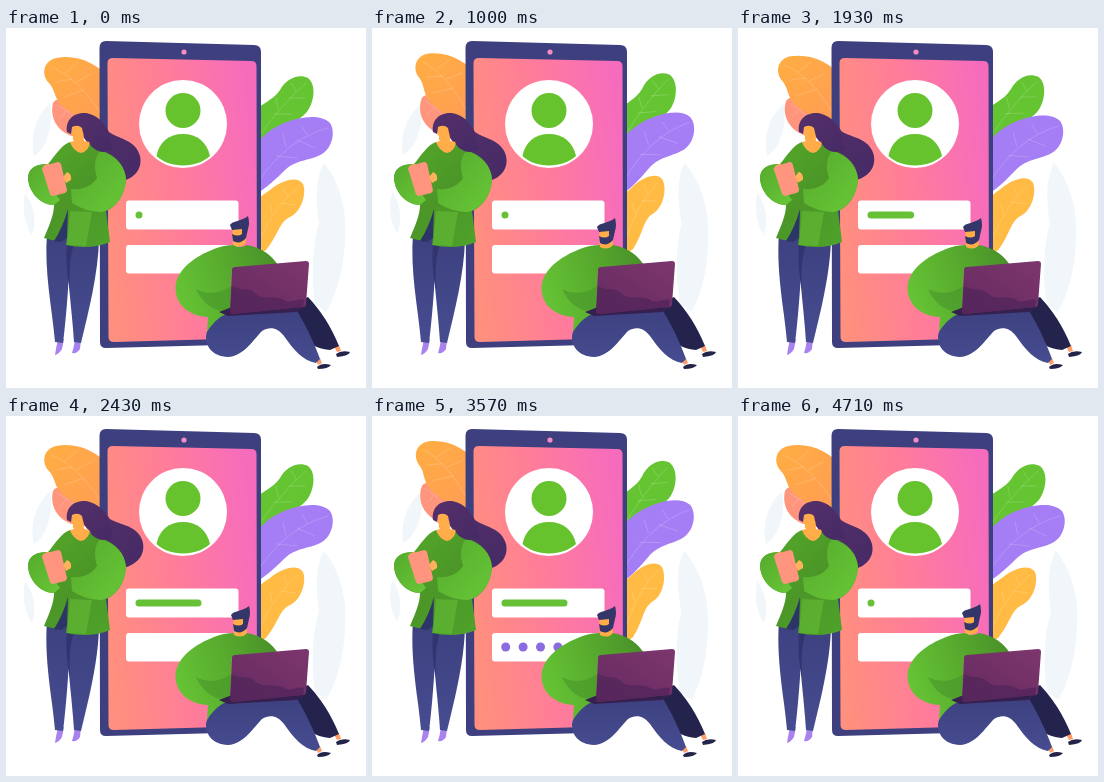
Write an HTML page that moves like this. It is 360 px wide and 360 px high and loops after 4780 ms.

```html
<!DOCTYPE html>
<html lang="en">
<head>
<meta charset="utf-8">
<title>Sign in</title>
<style>
html, body { margin: 0; width: 100%; height: 100%; overflow: hidden; background: #fff; }
svg { display: block; width: 100vw; height: 100vh; }
.vein { fill: none; stroke: #fff; stroke-opacity: .25; stroke-width: .7; stroke-linecap: round; }
</style>
</head>
<body>
<svg viewBox="0 0 360 360">
  <defs>
    <linearGradient id="screen" x1="0" y1=".6" x2="1" y2=".4">
      <stop offset="0" stop-color="#ff8f7e"/><stop offset=".5" stop-color="#ff7c9b"/><stop offset="1" stop-color="#f66cbd"/>
    </linearGradient>
    <linearGradient id="coat" x1="0" y1="0" x2="1" y2="1">
      <stop offset="0" stop-color="#57ab2c"/><stop offset=".5" stop-color="#4b9627"/><stop offset="1" stop-color="#4fa52c"/>
    </linearGradient>
    <linearGradient id="sleeve" x1="0" y1="0" x2="1" y2="1">
      <stop offset="0" stop-color="#55aa2c"/><stop offset="1" stop-color="#68c737"/>
    </linearGradient>
    <linearGradient id="sweater" x1="0" y1=".6" x2="1" y2=".3">
      <stop offset="0" stop-color="#66c435"/><stop offset=".5" stop-color="#59ad2e"/><stop offset="1" stop-color="#4a9229"/>
    </linearGradient>
    <linearGradient id="hair" x1="0" y1="0" x2="1" y2="1">
      <stop offset="0" stop-color="#563069"/><stop offset="1" stop-color="#452a66"/>
    </linearGradient>
    <linearGradient id="lid" x1="0" y1="1" x2="1" y2="0">
      <stop offset="0" stop-color="#642b60"/><stop offset="1" stop-color="#7d366e"/>
    </linearGradient>
    <linearGradient id="jeans" x1="0" y1="0" x2="0" y2="1">
      <stop offset="0" stop-color="#3d4180"/><stop offset="1" stop-color="#464c90"/>
    </linearGradient>
    <linearGradient id="gold" x1="0" y1="0" x2="1" y2="1">
      <stop offset="0" stop-color="#ffae42"/><stop offset="1" stop-color="#ff9a58"/>
    </linearGradient>
  </defs>

  <g fill="#f1f6fa">
    <path data-sway="3 50 190" d="M44 76C31 86 23 108 28 128C39 122 48 100 44 76Z"/>
    <path data-sway="3 50 190" d="M19 165C16 180 18 196 26 207C31 193 28 178 19 165Z"/>
    <path data-sway="-2 315 300" d="M318 135C309 150 310 175 313 195C306 220 305 250 309 276L320 284C334 262 341 225 339 190C337 168 329 148 318 135Z"/>
  </g>

  <g data-sway="6 96 100">
    <path fill="#ff957c" d="M47 75C51 68 63 69 72 78C84 88 92 96 100 112L70 109C54 106 43 92 47 75Z"/>
    <path class="vein" d="M51 77Q66 84 82 104M62 84l2-8M60 83l-6 8"/>
  </g>
  <g data-sway="6 100 95">
    <path fill="url(#gold)" d="M110 104L106 52C90 34 70 26 50 30C38 33 35 45 42 54C48 60 48 66 52 73C60 85 80 92 110 104Z"/>
    <path class="vein" d="M45 39Q72 49 98 90M59 45l12-10M70 54l15-8M66 51l-16 3M78 62l-20 7"/>
  </g>
  <g data-sway="-4.5 252 112">
    <path fill="#65c431" d="M246 122L246 86C253 76 267 73 274 62C280 51 292 45 302 50C311 57 308 76 300 85C289 97 272 97 262 113Z"/>
    <path class="vein" d="M300 55Q278 74 253 108M290 63l-5-8M283 70h16M272 81l-2-11M268 86h18"/>
  </g>
  <g data-sway="-5 250 160">
    <path fill="#a57ef5" d="M244 170L246 124C253 110 264 101 278 95C296 88 315 86 324 95C330 104 326 120 316 126C304 133 290 131 278 143C268 153 258 162 244 170Z"/>
    <path class="vein" d="M322 100Q281 111 252 154M301 107l-5-9M291 112l18 8M280 119l-3-13M271 128l20 2"/>
  </g>
  <g data-sway="-7 252 212">
    <path fill="#ffbb43" d="M246 230L245 186C249 172 256 167 264 162C275 153 291 147 297 156C301 166 295 184 284 189C273 194 273 206 260 222Z"/>
    <path class="vein" d="M292 159Q269 178 254 211M281 168l-3-8M275 175l14 2M266 186l-2-10"/>
  </g>

  <path fill="#3d3f7f" d="M93.500 20Q93.500 13 100 13L248 17Q255 17 255 24V286H215V317L100 320Q94 320 94 314Z"/>
  <path fill="url(#screen)" d="M101.500 35Q101.500 30 107 30L245 33Q250.500 33 250.500 38L251 286H215V311L108 314Q102.500 314 102.500 309Z"/>
  <circle cx="178" cy="24" r="2.600" fill="#f58bc5"/>

  <circle cx="177" cy="96" r="44" fill="#fff"/>
  <g fill="#66c32e">
    <circle cx="177" cy="82.500" r="17.500"/>
    <path d="M150.500 128C153 114 163 106 177 106S201 114 204 128C197 134 188 137.500 177 137.500S157 134 150.500 128Z"/>
  </g>
  <rect x="120" y="172.500" width="112.500" height="29" rx="3" fill="#fff"/>
  <rect x="120" y="217" width="112.500" height="28.500" rx="3" fill="#fff"/>
  <rect id="bar" x="129.500" y="183.500" height="7" rx="3.500" fill="#66c136"/>
  <g id="dots" fill="#8a6be0"></g>

  <g id="woman">
    <g fill="#a982ee">
      <path d="M52 311L58 311L56 321Q53 326 49 327Q50 320 52 311Z"/>
      <path d="M69 311L75 311L74 321Q71 326 66 325Q68 319 69 311Z"/>
    </g>
    <path fill="url(#jeans)" d="M41 205L64 208L63 244C62 265 60 290 57 315L49 314C46 280 38 244 41 205Z"/>
    <path fill="url(#jeans)" d="M61 212L93 212C92 246 83 282 75 315L68 314C66 280 60 244 61 212Z"/>
    <path fill="#32346f" d="M61 214L68 216Q62 233 64 262Q59 240 61 214Z"/>
    <path id="locks" fill="url(#hair)" d="M76 86C90 85 98 94 103 104C113 111 130 112 134 128C137 142 127 152 112 154C118 146 112 136 104 131C92 124 80 116 76 106Z"/>
    <path fill="url(#coat)" d="M64 114C68 118 76 118 82 114C87 120 91 122 96 123C110 127 119 138 120 151C119 168 110 179 100 183L104 214C91 220 74 220 60 217L61 209L55 213Q47 213 38 210C43 198 48 187 48 177C36 177 23 166 22 150C23 139 31 136 42 136C49 128 55 117 64 114Z"/>
    <g fill="url(#sleeve)">
      <path d="M94 123C110 127 119 138 120 151C119 169 108 181 96 184C84 184 74 180 66 175L65 161C77 162 86 158 91 150C88 140 88 130 94 123Z"/>
      <path d="M42 136C30 136 22 140 22 150C23 166 36 177 48 177L54 172Q44 160 42 136Z"/>
    </g>
    <path fill="#69c237" fill-opacity=".5" d="M64 183L86 184L80 218L61 217Z"/>
    <path fill="#2c3468" d="M62 181Q57 199 48 213L55 214L61 210Z"/>
    <path fill="#ffac49" d="M66 98L77 98L78 113L84 114Q83 123 75 125Q67 123 64 114L68 113Q66 111 67 108L65 106L66.500 103Z"/>
    <path fill="url(#hair)" d="M61 104C59 90 70 84 80 85C97 88 104 104 107 122L96 124C88 122 84 118 83 113Q77 108 76 100Q72 96 66 99L65 106Z"/>
    <g id="tablet">
      <path fill="#ffad55" d="M37 139Q39 136 43 136L46 140L40 145Z"/>
      <path fill="#ff957f" d="M36 141Q36 139 38 138L52 134Q54 134 55 136L61 162Q61 164 59 165L47 168Q45 168 44 166Z"/>
      <path fill="#ffb15b" d="M57 149L61 144Q66 146 65 152L60 155Z"/>
    </g>
  </g>

  <g id="man">
    <path fill="#ff9c65" d="M328 318L333 317L335 323L331 324ZM310 332L314 330L316 335L312 337Z"/>
    <path fill="#24234a" d="M330 326Q335 322 344 324Q343 328 331 329Z"/>
    <path fill="#24234a" d="M311 339Q316 334 325 337Q322 341 312 341Z"/>
    <path fill="#24234e" d="M278 280L302 269C315 283 325 298 333 318L324 322C313 321 305 318 300 309Z"/>
    <path fill="url(#jeans)" d="M219 284L290 281C298 294 308 314 314 331L310 335C297 333 287 321 278 308C272 300 264 298 256 303C247 312 238 328 222 329C206 328 200 319 200 308C202 297 208 290 219 284Z"/>
    <path fill="url(#sweater)" d="M208 221Q218 217 228 217Q234 221 241 217C257 220 266 228 272 237L226 242L224 285C215 287 208 293 201 304L202 289C183 288 169.500 277 169.500 260C170 241 190 228 208 221Z"/>
    <path fill="#438f2a" fill-opacity=".5" d="M190 261C202 267 212 266 226 258L224 282C211 286 197 277 190 261Z"/>
    <g id="head">
      <path fill="#ffac49" d="M228 200L240 200L241 217Q236 223 228 219L227 210Z"/>
      <path fill="#343568" d="M225 199C227 195 237 195 243 190Q245 197 243 203L241 212Q235 219 228 215L227 208Q233 211 237 208L237 203L227 204Z"/>
    </g>
    <path fill="#35204f" d="M213 284L226 279L290 281L300 274L299 280L290 284L222 288Z"/>
    <path fill="url(#lid)" d="M226 242Q226 239 229 239L300 233Q303 233 303 236L300 276Q300 279 297 279L227 286Q224 286 224 283Z"/>
    <path fill="#52255a" fill-opacity=".75" d="M226 258C236 264 242 258 250 266C260 274 270 265 280 273C286 275 292 270 298 272L297 279L227 286Q224 286 224 283Z"/>
  </g>
</svg>
<script>
const LOOP = 4780, STEPS = 67;
const $ = id => document.getElementById(id);
const swaying = [...document.querySelectorAll('[data-sway]')].map(el => {
  const [angle, x, y] = el.dataset.sway.split(' ').map(Number);
  return { el, angle, x, y };
});
const ramp = (t, a, b) => Math.min(1, Math.max(0, (t - a) / (b - a)));
const rotate = (el, angle, x, y) => el.setAttribute('transform', `rotate(${angle} ${x} ${y})`);

const dots = Array.from({ length: 4 }, (_, i) => {
  const dot = document.createElementNS('http://www.w3.org/2000/svg', 'circle');
  dot.setAttribute('cx', 133.7 + 17.4 * i);
  dot.setAttribute('cy', 231);
  $('dots').append(dot);
  return dot;
});

function draw(t) {
  const turn = t / LOOP * 2 * Math.PI;
  const swing = (1 - Math.cos(2 * turn)) / 2;
  const half = (1 - Math.cos(turn)) / 2;

  for (const s of swaying) rotate(s.el, s.angle * swing, s.x, s.y);
  rotate($('locks'), -4 * half * (1 - swing), 88, 92);
  rotate($('tablet'), Math.sin(2 * turn), 50, 155);

  const nod = (1 - half) ** 10;
  $('head').setAttribute('transform', `translate(${-nod} ${-2 * nod})`);

  const typed = ramp(t, 1060, 2350) - ramp(t, 4260, 4640);
  $('bar').setAttribute('width', 7 + 59 * typed);
  dots.forEach((dot, i) => {
    const shown = ramp(t, 2450 + 120 * i, 2550 + 120 * i) - ramp(t, 4560 - 70 * i, 4630 - 70 * i);
    dot.setAttribute('r', 4.5 * Math.max(0, shown));
  });
}

// Hold each pose for one fixed step of the loop.
function tick() {
  const step = Math.floor((performance.now() % LOOP + 2) / LOOP * STEPS) % STEPS;
  draw(step * LOOP / STEPS);
  requestAnimationFrame(tick);
}
tick();
</script>
</body>
</html>
```
